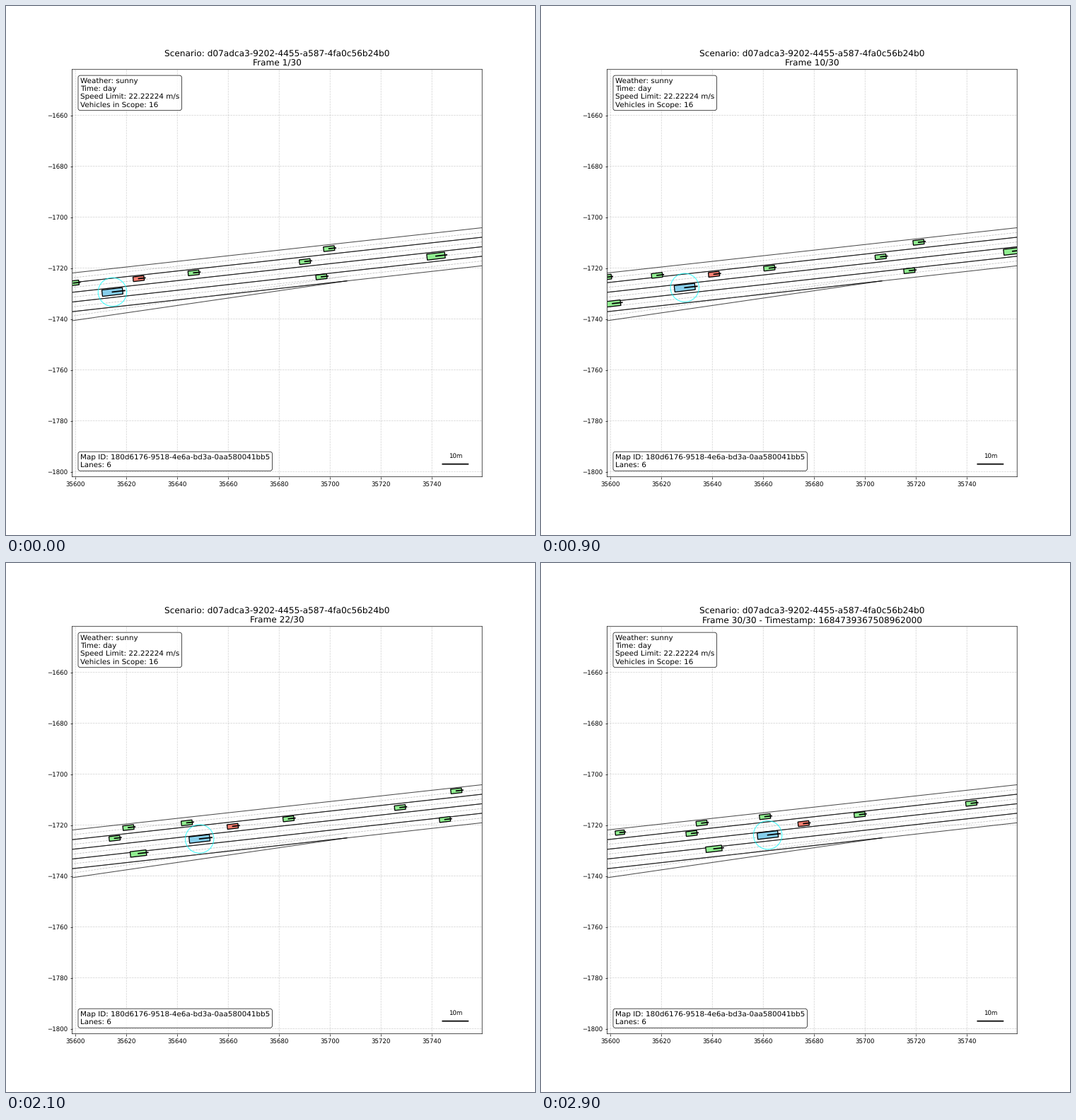
A matplotlib script for the animation above (3000 ms loop, 748x748 px).

```python
import numpy as np
import matplotlib.pyplot as plt
from matplotlib.animation import FuncAnimation
from matplotlib.patches import Circle, Polygon

FRAMES, INTERVAL = 30, 100
ORIGIN = np.array([35600.0, -1720.0])
CENTER_X, CENTER_Y = 35679.2, -1722.0
HALF_X, HALF_Y = 80.52, 80.0
LEFT, RIGHT, MERGE = -3.0, 162.0, 106.6
LANE_WIDTH, SLOPE = 3.75, 0.116

SCENARIO = "d07adca3-9202-4455-a587-4fa0c56b24b0"
MAP_ID = "180d6176-9518-4e6a-bd3a-0aa580041bb5"
TIMESTAMP = "1684739367508962000"

# Lines stay unsnapped and text unhinted, for soft edges and true widths.
plt.rcParams.update({"path.snap": False, "text.hinting": "no_hinting"})

fig, ax = plt.subplots(figsize=(12, 12), dpi=748 / 12)
ax.set_xlim(CENTER_X - HALF_X, CENTER_X + HALF_X)
ax.set_ylim(CENTER_Y - HALF_Y, CENTER_Y + HALF_Y)
ax.set_autoscale_on(False)
ax.set_xticks(range(35600, 35760, 20))
ax.set_yticks(range(-1800, -1640, 20))
ax.ticklabel_format(useOffset=False, style="plain")
ax.grid(True, linestyle="--", alpha=0.6)


def segment(start, end, **style):
    xs, ys = zip(ORIGIN + start, ORIGIN + end)
    ax.plot(xs, ys, **style)


def draw_lane(left, right, center=None):
    """Each side is a (start, end) pair; the centre defaults to their mean."""
    if center is None:
        center = (np.array(left) + right) / 2
    for side in (left, right):
        segment(*side, color="black", lw=1.2, alpha=0.7)
    segment(*center, color="gray", lw=0.9, ls="--", alpha=0.5)


def border(k, end=RIGHT):
    return [(x, -1.79 - 3.8 * k + (0.1104 + 0.0004 * k) * x)
            for x in (LEFT, end)]


def draw_road():
    for k in range(4):
        draw_lane(border(k), border(k + 1))
    inner = border(4, MERGE)
    outer = [(LEFT, -20.92), inner[1]]
    ramp = [(LEFT, -19.1), (MERGE, inner[1][1] + 1.9)]
    draw_lane(inner, outer, ramp)


def draw_labels():
    box = dict(boxstyle="round", facecolor="white", alpha=0.8)
    info = ("Weather: sunny\nTime: day\n"
            "Speed Limit: 22.22224 m/s\nVehicles in Scope: 16")
    ax.text(0.02, 0.98, info, transform=ax.transAxes, fontsize=12,
            va="top", bbox=box)
    ax.text(0.02, 0.02, f"Map ID: {MAP_ID}\nLanes: 6",
            transform=ax.transAxes, fontsize=12, va="bottom", bbox=box)
    x, y = CENTER_X + 65, CENTER_Y - HALF_Y + 5
    ax.plot([x, x + 10], [y, y], "k-", lw=2)
    ax.text(x + 5, y + 2, "10m", ha="center", va="bottom", fontsize=10)


class Vehicle:
    """Drives along its lane at a steady speed, drifting sideways if asked."""

    ahead = np.array([1, SLOPE]) / np.hypot(1, SLOPE)
    side = np.array([-ahead[1], ahead[0]])

    def __init__(self, x, speed, lane, length=4.3, color="lightgreen",
                 drift=0, power=1):
        self.x, self.speed, self.lane = x, speed, lane
        self.drift, self.power = drift, power
        half = np.array([length, 1.05 + 0.18 * length]) / 2
        square = np.array([(-1, -1), (1, -1), (1, 1), (-1, 1)])
        self.corners = square * half @ np.array([self.ahead, self.side])
        self.reach = self.ahead * length * 0.6
        self.body = ax.add_patch(Polygon(
            self.corners, facecolor=color, edgecolor="black", lw=1.5, zorder=10))
        self.pointer, = ax.plot([], [], "k-", lw=2, zorder=11)

    def move(self, i):
        x = self.x + self.speed * i
        lane = self.lane + self.drift * (i / (FRAMES - 1)) ** self.power
        pos = ORIGIN + (x, SLOPE * x - 3.7 - LANE_WIDTH * lane)
        self.body.set_xy(pos + self.corners)
        self.pointer.set_data(*zip(pos, pos + self.reach))
        return pos


draw_road()
draw_labels()
ego = Vehicle(14.5, 1.63, 1.97, length=8.1, color="skyblue")
ring = ax.add_patch(Circle((0, 0), 5.6, fill=False, edgecolor="cyan",
                           lw=1.3, alpha=0.7, zorder=9))
traffic = [
    Vehicle(24.8, 1.76, 0.89, color="salmon", drift=0.32, power=2),
    Vehicle(-0.8, 2.12, 0.56, drift=-0.55, power=0.8),
    Vehicle(99.6, 2.38, 0.06),
    Vehicle(-18.7, 1.88, -0.08),
    Vehicle(-54.3, 2.0, -0.08, length=3.6),
    Vehicle(46.4, 1.775, 0.95),
    Vehicle(90.1, 1.78, 1.12),
    Vehicle(-27.9, 2.06, 0.88),
    Vehicle(-61.9, 2.0, 0.75),
    Vehicle(141.6, 1.82, 2.14, length=7.1),
    Vehicle(96.6, 2.31, 2.92),
    Vehicle(-17.1, 1.99, 2.76, length=6.3),
]
title = ax.set_title("", fontsize=14)


def update(i):
    ring.center = tuple(ego.move(i))
    for vehicle in traffic:
        vehicle.move(i)
    text = f"Scenario: {SCENARIO}\nFrame {i + 1}/{FRAMES}"
    if i == FRAMES - 1:
        text += f" - Timestamp: {TIMESTAMP}"
    title.set_text(text)
    return []


anim = FuncAnimation(fig, update, frames=FRAMES, interval=INTERVAL,
                     init_func=lambda: update(0), repeat=True, repeat_delay=0)
plt.show()
```
